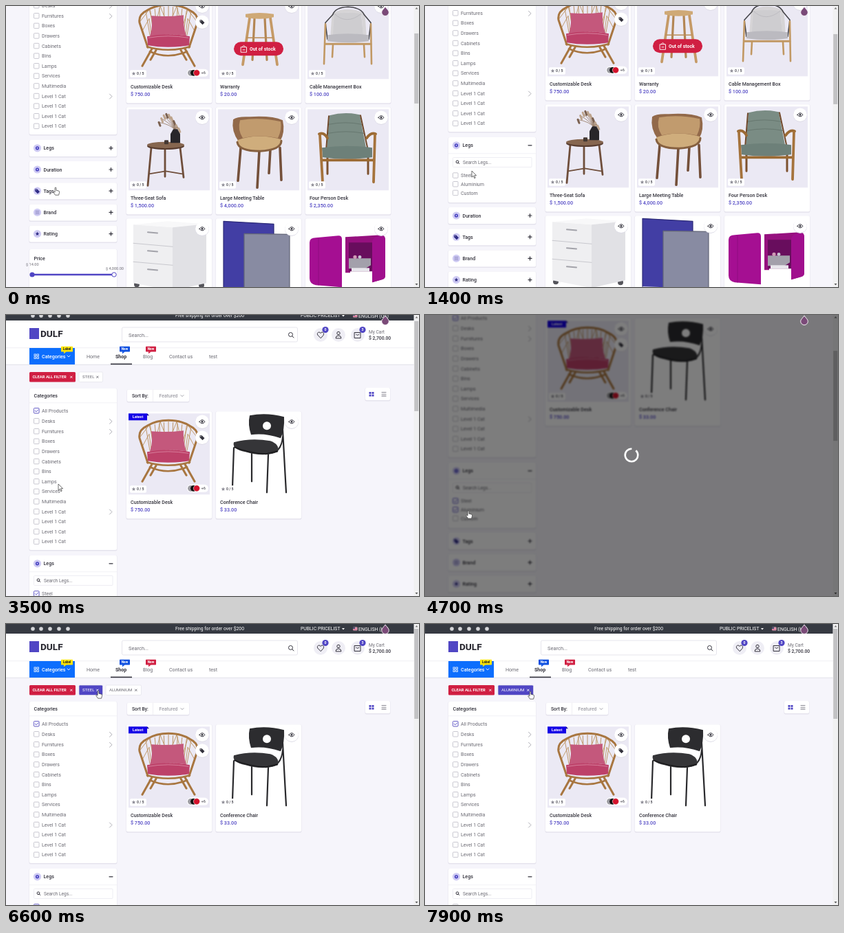
Recreate the animation shown at these times as an HTML page. Size 600 px wide and 409 px high, loop 8000 ms.

```html
<!DOCTYPE html>
<html lang="en">
<head>
<meta charset="utf-8">
<title>Shop filters</title>
<style>
html, body { margin: 0; width: 100%; height: 100%; overflow: hidden; background: #f6f5fb; }
svg { display: block; }
#stage { width: 100vw; height: 100vh; }
text { font-family: Roboto, Arial, sans-serif; white-space: pre; }
</style>
</head>
<body>
<svg id="stage" viewBox="0 0 600 409"></svg>
<script>
const INK = '#33323c', GREY = '#6b6a73', INDIGO = '#5046c4', RED = '#d01f42', LAVENDER = '#ebe9f4';

// Basic shapes; text is placed by its vertical centre.
const text = (x, y, s, { size = 7.1, fill = GREY, weight = 400, anchor = 'start' } = {}) =>
  `<text x="${x}" y="${y + size * 0.36}" font-size="${size}" fill="${fill}" font-weight="${weight}" text-anchor="${anchor}">${s}</text>`;
const rect = (x, y, w, h, fill, r = 0, more = '') =>
  `<rect x="${x}" y="${y}" width="${w}" height="${h}" rx="${r}" fill="${fill}" ${more}/>`;
const dot = (x, y, r, fill, more = '') => `<circle cx="${x}" cy="${y}" r="${r}" fill="${fill}" ${more}/>`;
const fillPath = (d, fill, more = '') => `<path d="${d}" fill="${fill}" ${more}/>`;
const line = (d, color, w = 1) =>
  `<path d="${d}" fill="none" stroke="${color}" stroke-width="${w}" stroke-linecap="round" stroke-linejoin="round"/>`;
const group = (x, y, s) => `<g transform="translate(${x} ${y})">${s}</g>`;
const box = (x, y, w, h, r = 2) => rect(x - .5, y, w + 1, h + 1.5, '#e5e3ed', r) + rect(x, y, w, h, '#fff', r);
const range = n => [...Array(n).keys()];

// Icons
const star = (x, y, r, fill) => fillPath('M' + range(10).map(i => {
  const a = i * Math.PI / 5, q = i % 2 ? r * .45 : r;
  return `${(x + q * Math.sin(a)).toFixed(2)} ${(y - q * Math.cos(a)).toFixed(2)}`;
}).join('L') + 'Z', fill);
const lens = (x, y, r, c = GREY) => line(`M${x + r * .7} ${y + r * .7}l${r * .8} ${r * .8}`, c) +
  dot(x, y, r, 'none', `stroke="${c}"`);
const chevron = (x, y, c = '#9a99a3') => line(`M${x - 1.5} ${y - 3.5}l3.5 3.5l-3.5 3.5`, c, .8);
const caret = (x, y, c) => line(`M${x - 2} ${y - 1}l2 2l2-2`, c, .8);
const labelIcon = (x, y, c = INK) => fillPath(`M${x - 3.5} ${y - 3}h3l4 4l-3 3l-4-4z`, c) + dot(x - 2, y - 1.6, .6, '#fff');
const eye = (x, y) => dot(x, y + .6, 10, '#dddbe6') + dot(x, y, 9.8, '#fff') +
  line(`M${x - 4} ${y}q4-5.4 8 0q-4 5.4-8 0z`, INK, 1) + dot(x, y, 1.4, INK);
const check = (y, id) => rect(40.5, y - 3.8, 7.5, 7.5, '#fff', 1, 'stroke="#bab9c4" stroke-width=".8"') +
  `<g id="${id}">${rect(40.5, y - 3.8, 7.5, 7.5, '#fff', 1, `stroke="${INDIGO}" stroke-width=".8"`)}${line(`M42.3 ${y}l1.5 1.6l2.8-3`, INDIGO, .9)}</g>`;
const flag = (x, y, w, s, bg, fg) => rect(x, y, w, 7.6, bg, .6) + fillPath(`M${x + 4} ${y + 7.4}h4l-4 3z`, bg) +
  text(x + w / 2, y + 3.9, s, { size: 4.8, fill: fg, weight: 700, anchor: 'middle' });

// Furniture, drawn in a 118 unit square
const WOOD = '#a87640', DARKWOOD = '#6f4e3b';
const art = {
  wicker: line('M34 74L20 99M82 74L96 99M40 76L32 90M76 76L84 90', WOOD, 3) +
    line('M27 71Q57 80 89 71M31 78Q57 90 85 78', WOOD, 2.6) +
    range(11).map(i => line(`M${25 + i * 6.6} ${12 + Math.abs(i - 5) * 1.4}L${31 + i * 5.4} 54`, '#b98c58', .9)).join('') +
    line('M17 34L30 17L38 44L46 12L58 42L70 12L78 44L86 17L99 34M20 48L30 30L34 60M96 48L86 30L82 60', '#bd935f', .9) +
    line('M28 72L16 36Q14 24 27 18Q40 10 58 10Q76 10 89 18Q102 24 100 36L88 72', WOOD, 3) +
    fillPath('M33 26Q57 28 80 25Q79 41 84 55Q58 51 31 56Q36 41 33 26Z', '#c4587c') +
    fillPath('M27 56Q57 50 89 56L88 69Q57 74 28 69Z', '#bd4169') + line('M29 58Q57 53 87 58', '#d8809d', 1),
  stool: line('M46 29L36 97M76 29L86 97', '#c59a66', 3.8) + line('M53 30L50 90M68 30L71 90', '#b38654', 3.2) +
    line('M42 58H79', '#b98b55', 1.6) + fillPath('M40 23.5Q60 20 81 23.5V28Q60 33 40 28Z', '#cfa976'),
  lounge: line('M36 52L38 24Q59 14 81 24L83 52', '#d6d4d6', 5) +
    line('M37 24Q40 14 59 13Q78 14 82 24M37 24L26 36L29 60M82 24L92 36L89 60', '#45454a', 1.6) +
    line('M26 38L24 96M92 38L93 96M37 68L36 86M82 68L83 86', '#c19863', 2.6) + line('M26 67H92', '#c19863', 3) +
    fillPath('M39 23Q59 20 78 23L81 54H37Z', '#cecdd0') + line('M39 23Q57 40 78 23', '#b9b8bd', .8) +
    fillPath('M29 54Q59 50 89 54V63Q59 67 29 63Z', '#bbbac0'),
  table: line('M33 56L28 111M75 56L80 99M53 57L53 98', DARKWOOD, 2.8) + line('M30 94L54 90L78 94', DARKWOOD, 1.8) +
    `<ellipse cx="54" cy="53.6" rx="27" ry="5.2" fill="#573c2f"/><ellipse cx="54" cy="52" rx="27" ry="4.6" fill="#86664f"/>` +
    range(9).map(i => {
      const x = 44 + i * 3.6, y = 19 - Math.sin(i * .5) * 12;
      return line(`M68 31Q${62 + i} 22 ${x} ${y}`, '#94765f', .8) + line(`M${x} ${y}l2 5`, i % 3 ? '#bda48d' : '#7b6150', 3);
    }).join('') +
    fillPath('M65 29H71L75 36V49H61V36Z', '#28262a') + rect(52, 45, 6, 6, '#443832', 1),
  caned: line('M33 56L29 104M60 60L57 114M90 56L92 103M76 58L74 93', '#74503a', 3.6) +
    fillPath('M22 15Q28 10 46 11Q78 9 94 16Q98 34 90 47Q60 38 30 47Q19 32 22 15Z', '#92694a') +
    fillPath('M32 16Q60 11 91 18Q93 30 87 42Q60 36 36 42Q28 30 32 16Z', '#c19b6e') +
    fillPath('M28 45Q58 34 92 44Q94 58 61 60Q28 60 28 45Z', '#cfad7c') + line('M28 48Q30 61 61 61Q92 59 92 46', '#86603f', 3),
  green: line('M29 58V94M88 58V94', '#7d512d', 3) + fillPath('M32 9Q54 3 76 8L85 56H28Z', '#7a8c84') +
    line('M31 22Q55 17 79 22M30 35Q56 30 82 35', '#66776f', 1) +
    line('M31 10L27 60M77 9L88 60', '#70492b', 2) + fillPath('M21 56Q57 51 94 56L94 70Q57 75 22 70Z', '#6d8079') +
    line('M21 74H96M17 36Q24 33 29 42M99 36Q92 33 86 42', '#9b6a33', 3.8) + line('M18 37L22 106M98 37L96 106', '#a5733c', 3.8),
  drawers: dot(12, 93, 4, '#55555b') + dot(63, 105, 4, '#55555b') + dot(106, 94, 4, '#55555b') +
    fillPath('M7 6L56 1L113 5L64 10Z', '#f8f8f9') + fillPath('M7 6L64 10V102L7 91Z', '#efeff1') +
    fillPath('M64 10L113 5V91L64 102Z', '#e1e1e5') +
    [0, 27, 54].map(y => (y ? line(`M7 ${6 + y}L64 ${11 + y}`, '#c8c8ce', 1) : '') + line(`M28 ${17 + y}l14 1.2`, '#a2a2a9', 2)).join(''),
  panels: fillPath('M8 1L81 5V102L8 100Z', '#423ea4') + line('M8 100V1L81 5V100', '#2d2b78', 1.2) +
    fillPath('M38 19L104 20V106L38 101Z', '#888ba2') + line('M38 101V19L104 20V104', '#626577', 1.2),
  booth: fillPath('M55 24L107 21Q113 21 113 28V80Q113 85 108 86L94 90V38H62V76H55Z', '#96117f') +
    fillPath('M60 32H94V74H60Z', '#680d5d') + fillPath('M60 55H92V65L84 70H60Z', '#a3a0ab') +
    rect(64, 69, 26, 5, '#e8e6ec') + dot(69, 53, 2.6, '#cf9ab5') + dot(76, 53, 2.4, '#c9c4d4') +
    fillPath('M3 32Q3 25 12 25L45 22Q50 22 50 27V97L12 94Q3 92 3 84Z', '#a50f92') + line('M16 26V94', '#8b0c7c', .8) +
    fillPath('M94 30Q96 23 107 22Q113 22 113 28V80Q113 85 108 86L94 90Z', '#a00f8d'),
  office: line('M23 50L21 107M49 58V99M73 60L71 115M94 24L99 115', '#29292c', 2.2) +
    line('M73 58Q92 58 94 34', '#29292c', 2) +
    fillPath('M46 3Q70 -2 96 5Q97 24 91 36Q68 28 48 31Q43 16 46 3Z', '#2c2c2f') + dot(71, 18, 6, '#fff') +
    fillPath('M23 42Q48 35 76 40Q90 45 87 56Q66 64 40 56Q20 52 23 42Z', '#353538') + line('M24 49Q45 58 70 59L86 55', '#1e1e20', 2)
};

function card(col, row, name, price, picture, { plain, id = '', extra = '' } = {}) {
  return group(178 + col * 130, 149.3 + row * 162,
    box(-3, -3, 124, 156) + (plain ? '' : rect(0, 0, 118, 118, LAVENDER)) + `<g id="${id}">${art[picture]}</g>` +
    rect(2, 105, 24, 10.5, '#fff', 2) + star(7.5, 110.2, 3, '#8e8d97') + text(12, 110.3, '0 / 5', { size: 5.2, fill: INK, weight: 500 }) +
    eye(107, 12) + extra +
    text(3, 129.2, name, { fill: INK, weight: 500 }) + text(3, 140.5, price, { size: 7.2, fill: INDIGO, weight: 500 }));
}

const desk = card(0, 0, 'Customizable Desk', '$ 750.00', 'wicker', { extra:
  fillPath('M0 0H27V10H0Z', '#1400e6') + fillPath('M27 0l3 3h-3z', '#0b0090') +
  text(13.5, 5, 'Latest', { size: 5.6, fill: '#fff', weight: 700, anchor: 'middle' }) +
  dot(107, 35.6, 10, '#dddbe6') + dot(107, 35, 9.8, '#fff') + labelIcon(107, 35) +
  rect(85, 103.5, 31, 11, '#fff', 5.5) + dot(90.5, 109, 4.4, '#9b9ba1') + dot(94.5, 109, 4.4, '#111') +
  dot(99, 109, 4.6, '#d3122c', 'stroke="#fff" stroke-width=".6"') + text(105.5, 109, '+6', { size: 5.8, fill: INK }) });
const soldOut = rect(23, 64, 72, 20, RED, 10) + line('M33.5 71.5h8v7.5h-8zM35.5 71.5q2-5 4 0M36 75.5h3', '#fff', .9) +
  text(46, 74, 'Out of stock', { size: 6.9, fill: '#fff', weight: 700 });
const allProducts = desk +
  card(1, 0, 'Warranty', '$ 20.00', 'stool', { extra: soldOut }) + card(2, 0, 'Cable Management Box', '$ 100.00', 'lounge') +
  card(0, 1, 'Three-Seat Sofa', '$ 1,500.00', 'table') + card(1, 1, 'Large Meeting Table', '$ 4,000.00', 'caned') +
  card(2, 1, 'Four Person Desk', '$ 2,350.00', 'green') +
  card(0, 2, '', '', 'drawers', { plain: true }) + card(1, 2, '', '', 'panels', { plain: true }) + card(2, 2, '', '', 'booth', { plain: true });
const steelProducts = desk + card(1, 0, 'Conference Chair', '$ 33.00', 'office', { plain: true, id: 'office' });

// Page header
const nav = (x, s, fill = GREY, weight = 400) => text(x, 66, s, { fill, weight });
const roundButton = (x, icon) => dot(x, 35, 10, '#efeef5') + icon;
const badge = (x, s) => dot(x, 27.5, 4.6, INDIGO) + text(x, 27.5, s, { size: 5.2, fill: '#fff', weight: 700, anchor: 'middle' });
const header = rect(0, 0, 600, 14, '#363a42') + rect(0, 14, 600, 64, '#fff') + rect(0, 53.5, 600, .7, '#e9e8ef') + rect(0, 77.8, 600, 1, '#e2e1e9') +
  [39, 51, 64, 77, 90].map(x => dot(x, 7, 2.8, '#d6d7da')).join('') +
  text(296, 6.8, 'Free shipping for order over $200', { size: 6.8, fill: '#fff', anchor: 'middle' }) +
  text(428, 7, 'PUBLIC PRICELIST', { size: 6.9, fill: '#fff' }) + fillPath('M488 6h4l-2 2.4z', '#fff') +
  rect(504, 4.5, 6.5, 5, '#e7d9de', 1) + line('M504.5 6h5.5M504.5 8.3h5.5', '#c04', .8) + rect(504, 4.5, 3, 2.6, '#446') +
  text(512, 7, 'ENGLISH (US)', { size: 7, fill: '#fff' }) +
  rect(34, 25, 14, 16, INDIGO) + text(50, 33.2, 'DULF', { size: 13.6, fill: '#22212a', weight: 700 }) +
  rect(168.5, 24, 255, 21, '#fff', 2, 'stroke="#e6e5ec"') + text(178, 35, 'Search...', { size: 7.5 }) + lens(413.5, 34.5, 3, INK) +
  roundButton(457, line('M457 39.5l-4.3-4.5q-1.2-3.4 2-4q1.6 0 2.3 1.6q.7-1.6 2.3-1.6q3.2.6 2 4z', INK)) +
  roundButton(483, dot(483, 32.5, 2.2, 'none', `stroke="${INK}"`) + line('M479 39.5q0-3.5 4-3.5t4 3.5z', INK)) +
  roundButton(511, line('M506.5 31.5h8.5v8h-8.5zM508.5 34q2.2 3 4.4 0', INK)) + badge(464, '0') + badge(518, '3') +
  text(527, 30.5, 'My Cart', { size: 6.6 }) + text(527, 39.5, '$ 2,700.00', { size: 6.8, fill: INK, weight: 500 }) +
  rect(34, 54, 66, 24, '#0d6efd') +
  [[41, 63], [45, 63], [41, 67], [45, 67]].map(([x, y]) => rect(x, y, 2.4, 2.4, 'none', 0, 'stroke="#fff" stroke-width=".8"')).join('') +
  nav(52, 'Categories', '#fff', 500) + caret(91, 66, '#fff') +
  nav(117, 'Home') + nav(159, 'Shop', INK, 700) + nav(199, 'Blog') + nav(237, 'Contact us') + nav(295, 'test') + rect(152, 76.6, 31, 1.6, INK) +
  flag(80, 51.8, 17, 'Label', '#ffe500', '#222') + flag(165, 51.8, 15, 'New', '#0d4fe0', '#fff') + flag(203, 51.8, 15, 'New', RED, '#fff');

const chip = (id, w, s) => `<g id="${id}">${rect(0, 89, w, 14.5, '#fff', 1.5, 'stroke="#e3e2ea" stroke-width=".7"')}` +
  text(5, 96.3, s, { size: 6.1 }) + line(`M${w - 9} 95l2.6 2.6m0-2.6l-2.6 2.6`, 'currentColor', .9) + '</g>';
const chips = `<g id="chips">${rect(34, 89, 67, 14.5, RED, 1.5)}` +
  text(38.5, 96.3, 'CLEAR ALL FILTER', { size: 5.85, fill: '#fff', weight: 700 }) + line('M93.5 95l2.6 2.6m0-2.6l-2.6 2.6', '#fff', .9) +
  chip('steelChip', 34.5, 'STEEL') + chip('aluChip', 51.5, 'ALUMINIUM') + '</g>';

// Sidebar
const names = ['All Products', 'Desks', 'Furnitures', 'Boxes', 'Drawers', 'Cabinets', 'Bins', 'Lamps', 'Services', 'Multimedia', ...Array(4).fill('Level 1 Cat')];
const parents = [1, 2, 10];
const categories = box(34, 113, 127, 235) + text(40.5, 123, 'Categories', { fill: INK, weight: 500 }) + rect(34, 133.5, 127, .7, '#ecebf2') +
  names.map((s, i) => {
    const y = 145.3 + i * 14.6 + Math.min(i, 2) * .4;
    return (i ? rect(40.5, y - 3.8, 7.5, 7.5, '#fff', 1, 'stroke="#bab9c4" stroke-width=".8"') : check(y, 'all')) +
      text(52, y, s) + (parents.includes(i) ? chevron(152, y + .5) : '');
  }).join('');
const marks = {
  Legs: y => dot(45.5, y, 2.6, '#4540c0') + dot(45.5, y, 1, '#d4d0f5'),
  Tags: y => labelIcon(45.5, y, '#302d86'),
  Brand: y => line(`M43 ${y - 2}h5M43 ${y}h5M43 ${y + 2}h5`, '#7f7ab8', .8),
  Rating: y => star(45.5, y, 3, '#302d86')
};
const title = (s, y) => dot(45.5, y, 5.6, '#cfcbf3') + (marks[s] || marks.Legs)(y) + text(54.5, y, s, { fill: INK, weight: 500 });
const panel = (s, y) => box(34, y - 12, 127, 24) + title(s, y) + line(`M150 ${y}h5M152.5 ${y - 2.5}v5`, INK, 1.2);
const panels = list => list.map((s, i) => panel(s, 399 + i * 31.2)).join('');
const legs = `${rect(33.5, 356, 128, 25.5, '#e5e3ed', 2, 'id="legShade"')}${rect(34, 356, 127, 24, '#fff', 2, 'id="legCard"')}` +
  title('Legs', 367.8) + line('M150 367.8h5', INK, 1.2) + `<g id="plus">${line('M152.5 365.3v5', INK, 1.2)}</g>` +
  `<svg id="legBody" x="34" y="379" width="127" height="0" viewBox="34 379 127 72" preserveAspectRatio="xMinYMin slice">` +
  rect(34, 379.5, 127, .7, '#ecebf2') + rect(40.5, 385.5, 114.5, 14, '#fff', 1, 'stroke="#eeedf3"') + lens(47, 391.8, 1.9, INK) +
  text(55, 392.4, 'Search Legs...', { size: 6.6 }) +
  ['Steel', 'Aluminium', 'Custom'].map((s, i) => check(411.6 + i * 12.7, 'check' + s) + text(52, 411.6 + i * 12.7, s)).join('') + '</svg>';
const price = box(34, 515, 127, 80) + text(40.5, 528, 'Price', { fill: INK, weight: 500 }) +
  text(29, 536.5, '$ 14.00', { size: 5.6 }) + text(145, 542.5, '$ 4,000.00', { size: 5.6 }) +
  rect(38, 550.7, 119, 2.6, INDIGO, 1) + dot(38, 552, 3.6, INDIGO) + dot(157, 552, 3.2, '#fff', `stroke="${INDIGO}"`);
const toolbar = box(176, 114.5, 90, 17.5) + rect(213, 114.5, .7, 17.5, '#e8e7ee') + text(183, 123.6, 'Sort By:', { size: 6.8, fill: INK, weight: 500 }) +
  text(222.5, 123.6, 'Featured', { size: 6.9, fill: '#8a8993' }) + caret(256, 123.6, '#8a8993') + box(522, 112, 36, 18) +
  [[527.5, 118], [531.5, 118], [527.5, 121.7], [531.5, 121.7]].map(([x, y]) => rect(x, y, 3, 2.8, INDIGO)).join('') +
  line('M546 118.5h6M546 121.2h6M546 123.9h6', '#8a8993', 1.1);

const stage = document.getElementById('stage');
stage.innerHTML = rect(0, 0, 600, 409, '#f6f5fb') +
  `<g id="page"><g id="scroller">${header}${chips}<g id="content">${categories}${toolbar}${legs}` +
  `<g id="below"><g id="belowAll">${panels(['Duration', 'Tags', 'Brand', 'Rating'])}${price}</g><g id="belowSteel">${panels(['Tags', 'Brand', 'Rating'])}</g></g>` +
  `<g id="gridAll">${allProducts}</g><g id="gridSteel">${steelProducts}</g></g></g></g>` +
  rect(592.5, 0, 7.5, 409, '#f1f1f2') + fillPath('M594.5 4.5h4l-2-2.6z', '#777') + fillPath('M594.5 404h4l-2 2.6z', '#555') +
  rect(593.2, 7, 6, 100, '#c2c2c4', 0, 'id="thumb"') +
  `<g id="overlay">${rect(0, 0, 600, 409, '#000', 0, 'opacity=".51"')}<circle id="spinner" cx="300" cy="204" r="9.3" fill="none" stroke="#fff" stroke-width="2.6" stroke-dasharray="51.5 7"/></g>` +
  fillPath('M551 1C553.5 4.7 556.3 6.5 556.3 9.2A5.3 5.3 0 0 1 545.7 9.2C545.7 6.5 548.5 4.7 551 1Z', '#7a4a78', 'stroke="#fff" stroke-width=".9"') +
  `<g id="arrow">${fillPath('M0 0V9.2L2.2 7.2L3.8 10.8L5.2 10.1L3.7 6.7H6.6Z', '#fff', 'stroke="#333" stroke-width=".7"')}</g>` +
  `<g id="hand">${fillPath('M-.9 .6Q0 -.8 .9 .6V4.2L4.8 5.2Q5.8 5.6 5.5 7.5L4.6 11.2H-.4L-3.2 7.2Q-3.4 5.6 -.9 7Z', '#fff', 'stroke="#333" stroke-width=".7"')}</g>`;

const el = Object.fromEntries([...stage.querySelectorAll('[id]')].map(n => [n.id, n]));
const set = (id, attrs) => { for (const k in attrs) el[id].setAttribute(k, attrs[k]); };
const show = (id, on) => { el[id].style.display = on ? '' : 'none'; };
const move = (id, x, y) => set(id, { transform: `translate(${x} ${y})` });

// Timeline: [time, ...values]
const scrollKeys = [[0, 132], [300, 136], [2400, 136], [3000, 0], [3400, 0], [3500, 6], [4100, 141], [5100, 141], [5700, 0]];
const pointerKeys = [[0, 72, 264], [800, 60, 204], [1000, 60, 204], [1400, 68, 240], [1600, 60, 246], [2400, 60, 246], [3000, 76, 246],
  [3500, 76, 246], [4200, 63, 285], [5100, 63, 285], [5800, 120, 120], [6300, 120, 120], [6600, 134, 97], [7100, 134, 97], [7900, 153, 98]];
const openKeys = [[1000, 0], [1300, 1]];
const loads = [[1700, 2300], [4400, 5100], [6800, 7500]];

function at(keys, t) {
  const i = keys.findIndex(k => k[0] > t);
  if (i < 0) return keys[keys.length - 1].slice(1);
  if (i === 0) return keys[0].slice(1);
  const a = keys[i - 1], b = keys[i], p = (t - a[0]) / (b[0] - a[0]);
  return a.slice(1).map((v, j) => v + (b[j + 1] - v) * p);
}

function paintChip(id, on, x, hover) {
  show(id, on);
  move(id, x, 0);
  const color = hover ? '#fff' : GREY;
  el[id].style.color = color;
  el[id].querySelector('rect').setAttribute('fill', hover ? INDIGO : '#fff');
  el[id].querySelector('text').setAttribute('fill', color);
}

function render(t) {
  const [scroll] = at(scrollKeys, t), [open] = at(openKeys, t), [x, y] = at(pointerKeys, t);
  const filtered = t >= 2300, height = filtered ? 131 : 102;
  move('scroller', 0, -scroll);
  move('content', 0, filtered ? 0 : -29);
  move('below', 0, open * 71);
  set('legCard', { height: 24 + 71 * open });
  set('legShade', { height: 25.5 + 71 * open });
  set('legBody', { height: 72 * open, viewBox: `34 379 127 ${Math.max(72 * open, .1)}` });
  show('legBody', open > 0);
  show('plus', open === 0);
  for (const part of ['grid', 'below']) {
    show(part + 'All', !filtered);
    show(part + 'Steel', filtered);
  }
  show('office', t >= 2500);
  show('chips', filtered);
  paintChip('steelChip', t < 7500, 106, t >= 6500);
  paintChip('aluChip', t >= 5100, t < 7500 ? 145 : 106, t >= 7500);
  show('checkSteel', t >= 1600 && t < 7500);
  show('checkAluminium', t >= 4300);
  show('checkCustom', false);
  set('thumb', { y: 7 + scroll * height / 409, height });

  const load = loads.find(([a, b]) => t >= a && t < b);
  show('overlay', load);
  el.page.style.filter = load ? 'blur(1px)' : '';
  if (load) {
    el.overlay.style.opacity = Math.min(1, (t - load[0] + 100) / 200);
    set('spinner', { transform: `rotate(${(t - 4700) * .36 - 47} 300 204)` });
  }
  const pointing = t < 1100 || (t >= 4100 && t < 5200) || t >= 6500;
  show('hand', pointing);
  show('arrow', !pointing);
  move(pointing ? 'hand' : 'arrow', x, y);
}

const start = performance.now();
function tick(now) {
  render(Math.floor((Math.max(0, now - start) % 8000) / 100) * 100);
  requestAnimationFrame(tick);
}
render(0);
requestAnimationFrame(tick);
</script>
</body>
</html>
```
